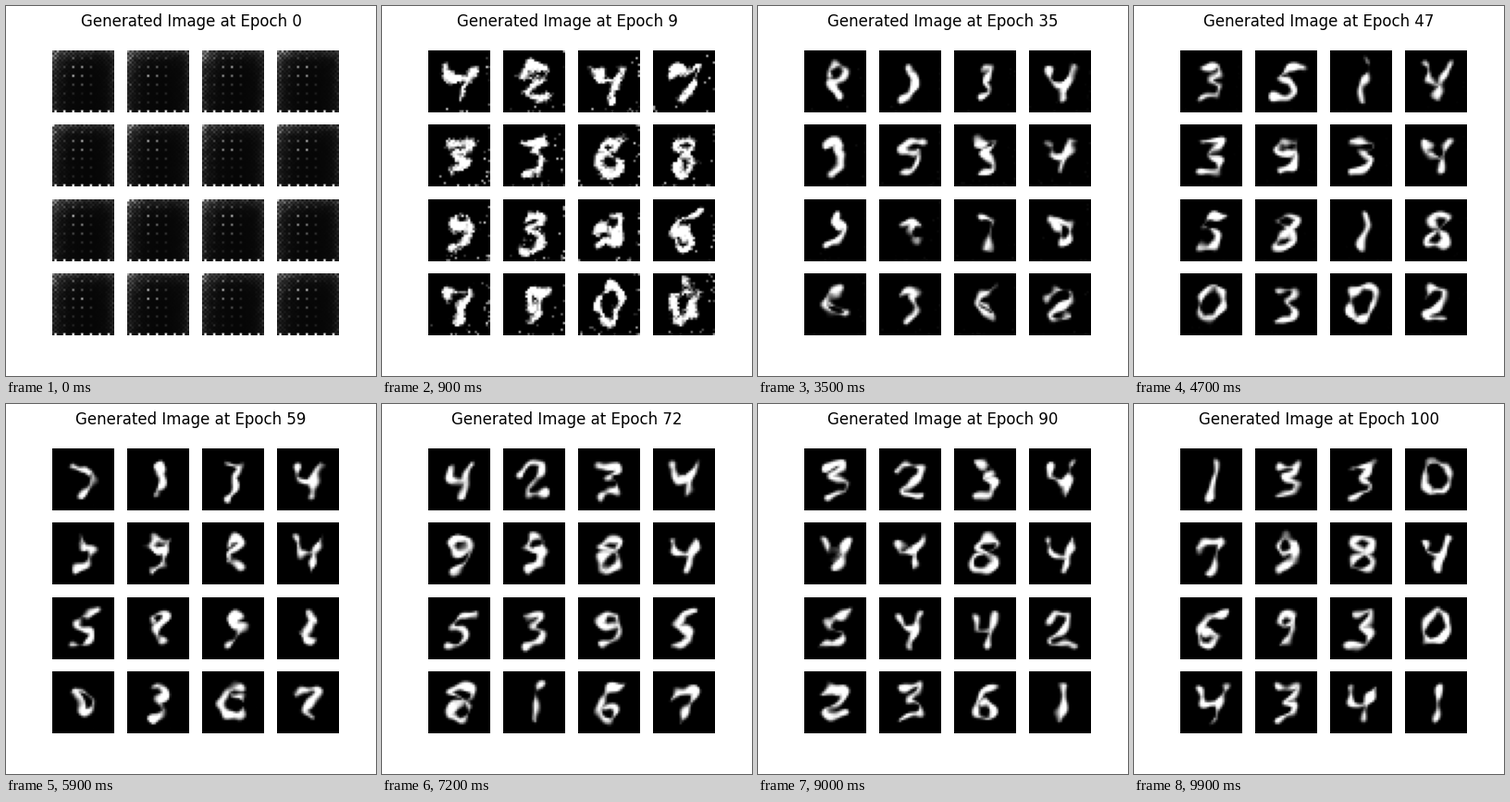
These frames come from a looping animation (400 px wide and 400 px high, 10000 ms). A matplotlib script:

```python
import numpy as np
import matplotlib.pyplot as plt
from matplotlib.animation import FuncAnimation

SIZE = 28
FRAMES = 100
Y, X = np.mgrid[0:SIZE, 0:SIZE].astype(float)


def stroke(*xy, n=64, blur=7):
    """Evenly spaced points along a rounded path x, y, x, y, ..."""
    pts = np.array(xy, float).reshape(-1, 2)
    length = np.r_[0, np.hypot(*np.diff(pts, axis=0).T).cumsum()]
    at = np.linspace(0, length[-1], n)
    kernel = np.hanning(blur + 2)[1:-1]
    kernel /= kernel.sum()
    smooth = [
        np.convolve(np.pad(np.interp(at, length, axis), blur // 2, mode="edge"), kernel, "valid")
        for axis in pts.T
    ]
    return np.column_stack(smooth) - 0.5


DIGITS = [
    stroke(15, 6, 10, 9, 8, 16, 11, 21, 17, 20, 20, 13, 19, 8, 15, 6),
    stroke(16, 6, 16, 11, 15, 16, 14, 22),
    stroke(8, 11, 12, 7, 18, 8, 18, 12, 10, 19, 11, 21, 19, 20),
    stroke(10, 8, 18, 7, 18, 10, 13, 13, 18, 16, 17, 20, 10, 22),
    stroke(9, 8, 10, 14, 16, 15, 20, 7, 17, 14, 15, 22),
    stroke(21, 7, 14, 8, 11, 13, 17, 15, 17, 19, 13, 22, 8, 21),
    stroke(20, 6, 13, 9, 9, 16, 10, 21, 15, 22, 18, 17, 15, 14, 11, 16),
    stroke(8, 12, 11, 9, 19, 8, 17, 13, 15, 18, 13, 23),
    stroke(15, 13, 10, 10, 14, 6, 20, 8, 18, 12, 10, 16, 9, 21, 15, 22, 19, 18, 15, 13),
    stroke(18, 9, 13, 7, 10, 11, 13, 14, 18, 12, 18, 8, 18, 14, 16, 19, 11, 22),
]

# Digit that each of the 16 samples resembles at a few epochs.
LOOKS = {
    9: "4247338893967900",
    23: "8734753444705752",
    47: "3514393458180302",
    72: "4234998453958167",
    90: "3234448454422361",
    100: "1330798469304341",
}
EPOCHS = np.array(list(LOOKS))


def skeleton(epoch, cell):
    """Glide from one digit's path to the next."""
    i = np.clip(np.searchsorted(EPOCHS, epoch), 1, len(EPOCHS) - 1)
    a, b = EPOCHS[i - 1], EPOCHS[i]
    t = np.clip((epoch - a) / (b - a), 0, 1)
    t = t * t * (3 - 2 * t)
    start, end = (DIGITS[int(LOOKS[e][cell])] for e in (a, b))
    return start + (end - start) * t


def waves(rng, epoch, lo=0.2, hi=0.6, count=6):
    """Smooth random field of about unit variance, drifting with the epoch."""
    total = np.zeros_like(X)
    for _ in range(count):
        angle, phase = rng.uniform(0, 2 * np.pi, 2)
        k = rng.uniform(lo, hi)
        phase += rng.normal(0, 0.5) * epoch
        total += np.cos(k * (X * np.cos(angle) + Y * np.sin(angle)) + phase)
    return total * np.sqrt(2 / count)


def untrained(cell):
    """Stride pattern of the untrained generator."""
    rng = np.random.default_rng((3, cell))
    grain = rng.uniform(0.5, 1.2, X.shape)
    glow = 0.4 * np.exp(-(X + Y) / 5) + 0.22 * np.exp(-Y / 2.2)
    glow += 0.2 * np.exp(-X / 3) + 0.16 * np.exp((X - 27) / 2)
    img = 0.025 + glow * grain * np.where((X + Y) % 2 == 0, 1, 0.4)
    peak = 0.6 * np.exp(-((X - 11) / 4.5) ** 2 - ((Y - 9) / 6) ** 2) + 0.12 * (X < 18)
    img += (X % 4 == 1) * ((Y % 4 == 3) * peak * grain + (Y == 27) * 0.9)
    return np.clip(img, 0, 1)


def generated(epoch, cell):
    if epoch == 0:
        return untrained(cell)
    rng = np.random.default_rng((11, cell))
    early = np.exp(-epoch / 10)
    bend = 0.6 + early
    x = X + bend * waves(rng, epoch)
    y = Y + bend * waves(rng, epoch)
    dots = skeleton(epoch, cell)
    dist = np.hypot(x[..., None] - dots[:, 0], y[..., None] - dots[:, 1]).min(-1)

    width = 1.15 + early + 0.6 * waves(rng, epoch, 0.3, 0.9)
    grit = np.random.default_rng((epoch, cell))
    f = width - dist + 0.9 * early * grit.normal(size=X.shape)
    v = np.clip(f / (2.2 - early) + 0.5, 0, 1)
    v = v * v * (3 - 2 * v)

    rim = np.exp(-(27 - np.maximum(X, Y)) / 1.5)
    specks = (grit.random(X.shape) < 0.12 * rim) * grit.uniform(0.2, 2, X.shape)
    return np.clip(v + early * specks, 0, 1)


fig, axes = plt.subplots(4, 4, figsize=(4, 4), dpi=100)
title = fig.suptitle("")
images = []
for ax in axes.flat:
    ax.axis("off")
    images.append(ax.imshow(np.zeros((SIZE, SIZE)), cmap="gray", vmin=0, vmax=1))


def update(n):
    epoch = n if n < FRAMES - 1 else FRAMES
    title.set_text(f"Generated Image at Epoch {epoch}")
    for cell, image in enumerate(images):
        image.set_data(generated(epoch, cell))
    return [title, *images]


anim = FuncAnimation(fig, update, frames=FRAMES, interval=100, repeat=True, repeat_delay=0)
plt.show()
```
